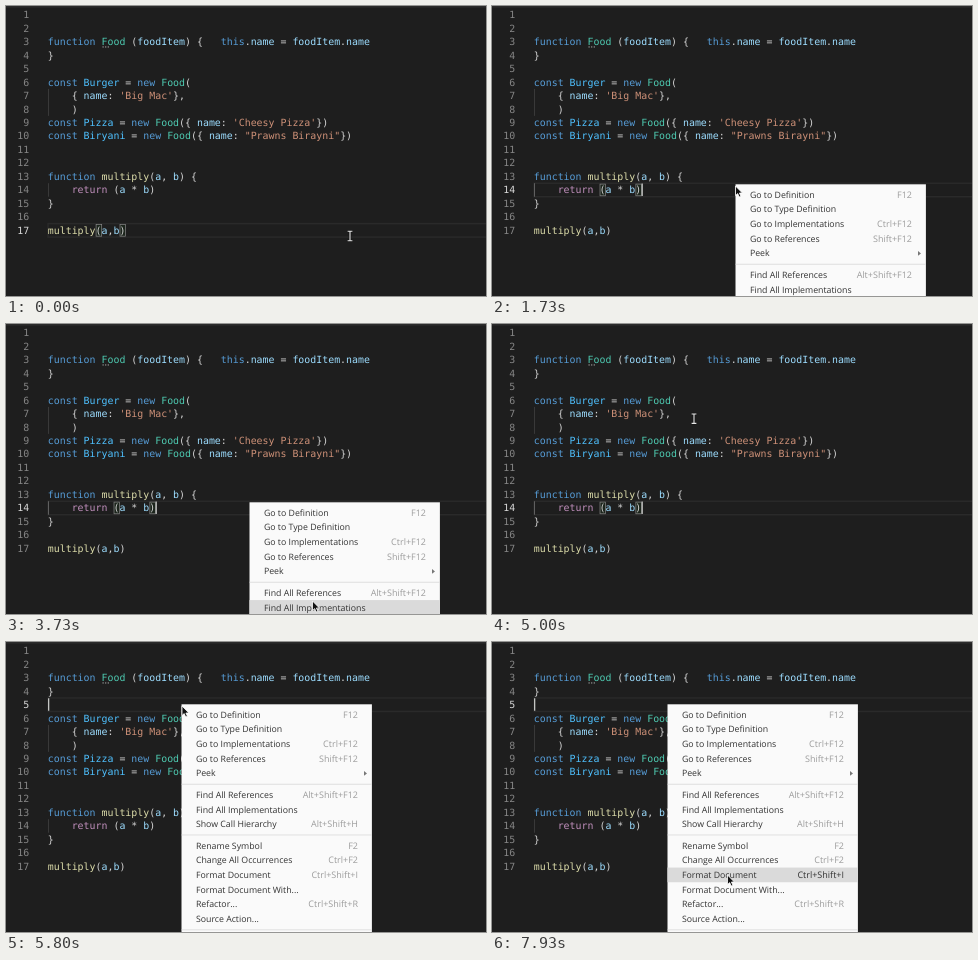
Write an HTML page that moves like this. It is 480 px wide and 290 px high and loops after 8 s.

```html
<!DOCTYPE html>
<html lang="en">
<head>
<meta charset="utf-8">
<title>Editor context menu</title>
<style>
html, body { margin: 0; width: 100%; height: 100%; overflow: hidden; background: #1e1e1e; }
svg { display: block; }
text { white-space: pre; text-rendering: geometricPrecision; }
.code { font: 9.925px "DejaVu Sans Mono", monospace; fill: #d4d4d4; }
.num { fill: #858585; text-anchor: end; }
.num.on { fill: #d8d8d8; }
.menu { font: 8.77px "Open Sans", sans-serif; fill: #333; }
.key { font-size: 9px; fill: #9c9c9c; text-anchor: end; }
.hot .key { fill: #333; }
.row { fill: none; }
.hot .row { fill: #dadada; }
</style>
</head>
<body>
<svg id="stage" width="480" height="290" viewBox="0 0 480 290"></svg>
<script>
const LINE = 13.47, TOP = 2.1, LEFT = 42, CHAR = 5.975, ROW = 14.72;
const stage = document.getElementById('stage');

function add(parent, tag, attrs, text) {
  const el = document.createElementNS('http://www.w3.org/2000/svg', tag);
  for (const k in attrs) el.setAttribute(k, attrs[k]);
  if (text) el.textContent = text;
  parent.append(el);
  return el;
}
const rect = (parent, x, y, width, height, more) =>
  add(parent, 'rect', { x, y, width, height, ...more });
const show = (el, on) => { el.style.display = on ? '' : 'none'; };
const lineTop = n => TOP + (n - 1) * LINE;

const code = `

function Food (foodItem) {   this.name = foodItem.name
}

const Burger = new Food(
    { name: 'Big Mac'},
    )
const Pizza = new Food({ name: 'Cheesy Pizza'})
const Biryani = new Food({ name: "Prawns Birayni"})


function multiply(a, b) {
    return (a * b)
}

multiply(a,b)`.split('\n');

const colors = [
  [/^['"]/, '#ce9178'],
  [/^(function|const|new|this)$/, '#569cd6'],
  [/^return$/, '#c08fbc'],
  [/^Food$/, '#4ec9b0'],
  [/^(Burger|Pizza|Biryani)$/, '#4fc1ff'],
  [/^multiply$/, '#dcdcaa'],
  [/^\w/, '#9cdcfe'],
  [/./, '#d4d4d4']
];

rect(stage, 0, 0, 480, 1.6, { fill: '#2c2c2c' });

// The marks that belong to each active line: frame, brackets, caret.
function makeActive(line, brackets, caret) {
  const g = add(stage, 'g', {}), y = lineTop(line);
  rect(g, LEFT, y, 445, LINE, { fill: 'none', stroke: '#2a2a2a', 'stroke-width': 1.4 });
  for (const col of brackets)
    rect(g, LEFT + col * CHAR + .3, y + .9, CHAR - .4, LINE - 1.8,
      { fill: '#1c251c', stroke: '#888', 'stroke-width': .7 });
  if (caret !== null)
    rect(g, LEFT + caret * CHAR, y + .3, 1.3, LINE - 1, { fill: '#c4c5c3' });
  return { line, g };
}
const actives = [makeActive(17, [8, 12], null), makeActive(14, [11, 17], 18), makeActive(5, [], 0)];

rect(stage, LEFT, lineTop(7), .8, 2 * LINE, { fill: '#404040' });
const guide = rect(stage, LEFT, lineTop(14), .8, LINE, {});

const numbers = code.map((src, i) => {
  const y = lineTop(i + 1) + LINE / 2 + 3.43;
  const row = add(stage, 'text', { class: 'code', x: LEFT - .2, y });
  for (const part of src.match(/'[^']*'|"[^"]*"|\w+|[^\w'"]+/g) || [])
    add(row, 'tspan', { fill: colors.find(c => c[0].test(part))[1] }, part);
  return add(stage, 'text', { class: 'code num', x: 23.3, y }, String(i + 1));
});
for (let i = 0; i < 3; i++) rect(stage, 96.5 + i * 2.6, 40.4, 1.2, 1.1, { fill: '#a8a8a8' });

const items = [
  ['Go to Definition', 'F12'], ['Go to Type Definition', ''],
  ['Go to Implementations', 'Ctrl+F12'], ['Go to References', 'Shift+F12'], ['Peek', '▸'],
  null,
  ['Find All References', 'Alt+Shift+F12'], ['Find All Implementations', ''],
  ['Show Call Hierarchy', 'Alt+Shift+H'],
  null,
  ['Rename Symbol', 'F2'], ['Change All Occurrences', 'Ctrl+F2'],
  ['Format Document', 'Ctrl+Shift+I'], ['Format Document With...', ''],
  ['Refactor...', 'Ctrl+Shift+R'], ['Source Action...', ''],
  null
];

function makeMenu(x, y, from, to) {
  const g = add(stage, 'g', { class: 'menu' }), rows = [];
  rect(g, x, y, 190.4, 300, { fill: '#fafafa' });
  let mid = y + 10.2;
  for (const item of items) {
    if (!item) {
      rect(g, x, mid - 4.3, 190.4, .8, { fill: '#d8d8d8' });
      mid += 6.6;
      continue;
    }
    const [label, key] = item, el = add(g, 'g', {});
    rect(el, x, mid - ROW / 2, 190.4, ROW, { class: 'row' });
    add(el, 'text', { x: x + 14.4, y: mid + 3.1 }, label);
    if (key === '▸')
      add(el, 'path', { d: `M${x + 182.5} ${mid - 2.4}l3 2.4l-3 2.4z`, fill: '#777' });
    else add(el, 'text', { class: 'key', x: x + 176.5, y: mid + 3.1 }, key);
    rows.push({ el, mid });
    mid += ROW;
  }
  return { g, rows, x, from, to };
}
const menus = [makeMenu(243.5, 178.3, 25, 75), makeMenu(175.5, 62.3, 87, 120)];

const beam = add(stage, 'g', {});
for (const [stroke, width] of [['#111', 2.4], ['#e8e8e8', 1.1]])
  add(beam, 'path', { d: 'M-2.4-4.7H2.4M0-4.7V4.7M-2.4 4.7H2.4', fill: 'none', stroke, 'stroke-width': width });
const arrow = add(stage, 'path', {
  d: 'M0 0V9.6L2.2 7.6L3.7 11L5.4 10.2L3.9 7H6.9Z',
  fill: '#111', stroke: '#fff', 'stroke-width': .8
});

// Pointer moves: start step, end step, x, y.
const moves = [
  [0, 5, 262, 214], [10, 13, 243.5, 180], [34, 35, 310.5, 235], [44, 45, 311, 222],
  [55, 56, 306.5, 277], [63, 67, 215, 110], [74, 77, 176, 64], [90, 96, 238, 234],
  [97, 100, 224.5, 157], [100, 104, 215, 88], [105, 112, 234, 224], [117, 119, 235.5, 233]
];

function pointerAt(step) {
  let x = 344, y = 230;
  for (const [a, b, toX, toY] of moves) {
    const p = Math.min(1, Math.max(0, (step - a) / (b - a)));
    x += (toX - x) * p;
    y += (toY - y) * p;
  }
  return [x, y];
}

function draw(now) {
  const step = Math.floor((now % 8000 + 4) * .015) % 120;   // 15 steps a second
  const [px, py] = pointerAt(step);
  const line = step < 24 ? 17 : step < 85 ? 14 : 5;
  let open = false;

  for (const a of actives) show(a.g, a.line === line);
  numbers.forEach((el, i) => el.classList.toggle('on', i + 1 === line));
  guide.setAttribute('fill', line === 14 ? '#707070' : '#404040');

  for (const m of menus) {
    const on = step >= m.from && step < m.to;
    show(m.g, on);
    open = open || on;
    for (const r of m.rows)
      r.el.classList.toggle('hot', px > m.x + 1 && px < m.x + 190 && Math.abs(py - r.mid) < ROW / 2);
  }

  show(beam, !open);
  show(arrow, open);
  for (const el of [beam, arrow]) el.setAttribute('transform', `translate(${px} ${py})`);
}

const start = performance.now();
function tick() {
  draw(performance.now() - start);
  requestAnimationFrame(tick);
}
tick();
</script>
</body>
</html>
```
